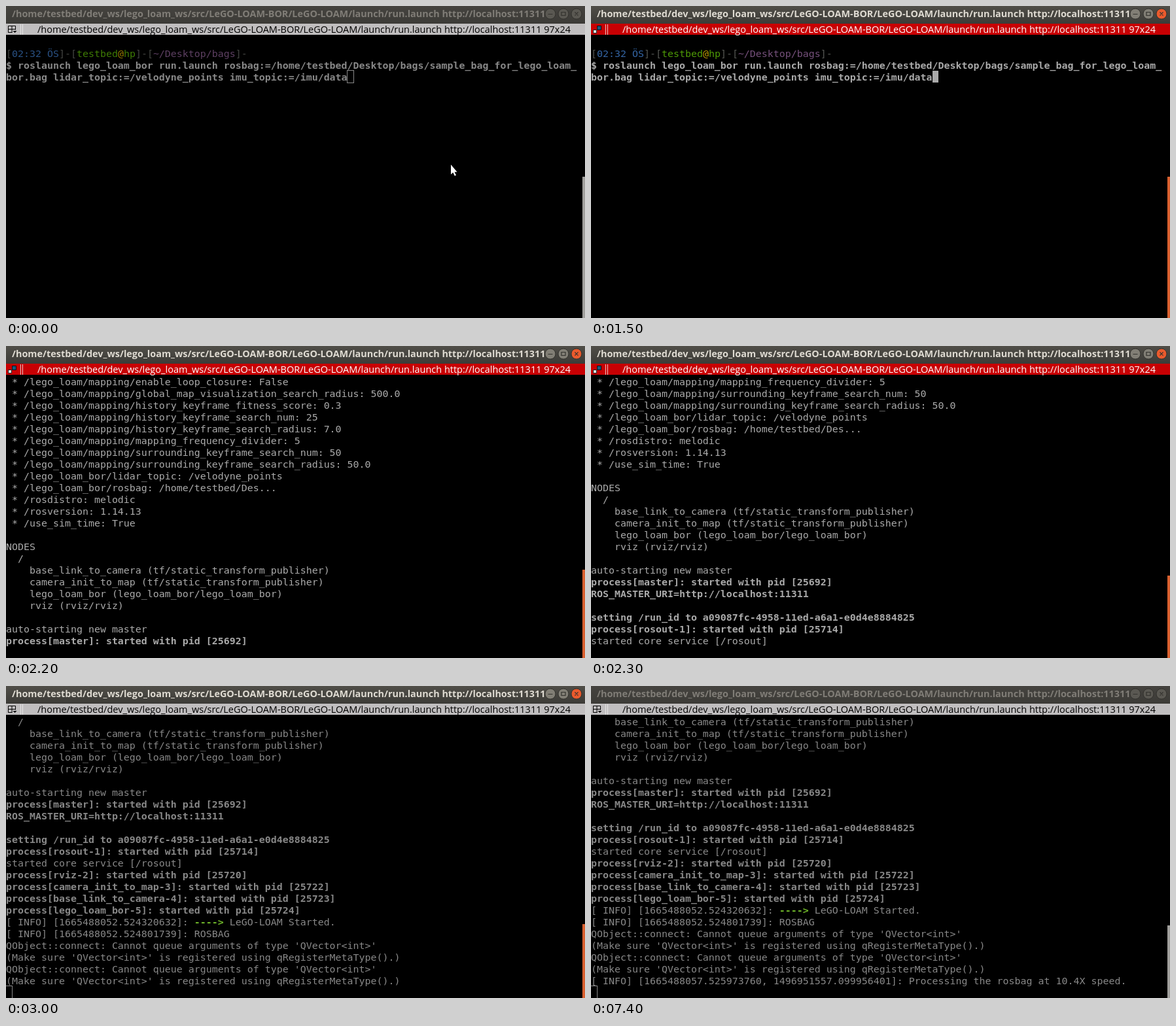
An HTML page that plays this animation: 885x477 px, repeating every 8 s.

```html
<!DOCTYPE html>
<html lang="en">
<head>
<meta charset="utf-8">
<title>Terminal launch</title>
<style>
html, body { margin: 0; width: 100%; height: 100%; overflow: hidden; background: #000; }
#stage { position: relative; width: 885px; height: 477px; overflow: hidden; background: #000; }
#stage * { box-sizing: border-box; }
#title, #tab {
  position: absolute; left: 0; width: 885px; white-space: pre;
  font: 14.43px/18px "Open Sans", "Noto Sans", sans-serif;
}
#title { top: 0; height: 27px; line-height: 24px; font-weight: 700; color: #807d77; background: linear-gradient(#45433f, #3c3b37); }
#tab { top: 27px; height: 17px; font-size: 14.5px; color: #000; background: #c0bebf; }
#title span, #tab span { position: absolute; top: 0; }
.windowFocus #title { color: #dfdbd2; background: linear-gradient(#504e48, #3c3b37); }
.paneFocus #tab { color: #fff; background: #c80003; }
svg { position: absolute; left: 0; top: 0; }
.button { fill: #5a5852; stroke: #33322e; }
.glyph { fill: none; stroke: #33322e; stroke-width: 1.2; }
.windowFocus .button { fill: #817e75; }
.windowFocus .close { fill: #ea5a2d; }
.activeIcon, .paneFocus .idleIcon { display: none; }
.paneFocus .activeIcon { display: inline; }
#screen { position: absolute; left: 0; top: 45px; width: 885px; height: 432px; overflow: hidden; }
#log {
  position: absolute; left: 0; margin-top: 1px; color: #aaa; opacity: .8;
  font: 14.95px/18px "DejaVu Sans Mono", monospace; font-variant-ligatures: none;
}
.paneFocus #log { opacity: 1; }
#log div { height: 18px; white-space: pre; }
.k { color: #555753; } .b { color: #3465a4; } .g { color: #4e9a06; }
.y { color: #c4a000; } .m { color: #75507b; } b.l { color: #8ae234; }
#cursor { position: absolute; width: 11px; height: 20px; margin: -1px; border: 1px solid #888; }
.paneFocus #cursor { width: 9px; height: 18px; margin: 0; border: 0; background: #aaa; }
#thumb { position: absolute; left: 881px; width: 4px; bottom: 0; background: #a09f9c; }
.windowFocus #thumb { background: #d9602f; }
</style>
</head>
<body>
<div id="stage">
  <div id="title"><span></span></div>
  <div id="tab"><span></span></div>
  <div id="screen"><div id="log"></div><div id="cursor"></div></div>
  <div id="thumb"></div>
  <svg width="885" height="477">
    <circle class="button" cx="832" cy="12" r="8"/>
    <circle class="button" cx="852" cy="12" r="8"/>
    <circle class="button close" cx="872" cy="12" r="8"/>
    <path class="glyph" d="M828.5 12.5h7M849 9.500h6v5h-6zM869.500 9.500l5 5m0-5l-5 5"/>
    <g class="idleIcon">
      <path d="M3.5 30.5h11v6M3.5 30.5v10h6M9 30.5v10M3.5 35.5h11" fill="none" stroke="#000"/>
      <path d="M10.5 38h6l-3 3z"/>
      <path d="M22.5 28v16M25.5 28v16" stroke="#e6e5e5"/>
    </g>
    <g class="activeIcon">
      <path d="M9.5 30.5h6v6h-6z" fill="#155a80" stroke="#111"/>
      <path d="M3.5 36.5h5v5h-5z" fill="#ddd" stroke="#222"/>
      <path d="M22.5 28v16M25.5 28v16" stroke="#f2c5c5"/>
    </g>
    <path id="arrow" d="M680 242.5v15l3.3-3 2.5 5.2 2.2-1-2.5-5h4z" fill="#fff"/>
    <path id="beam" d="M-2.5-6.5h2l.5.5.5-.5h2M0-6V6M-2.5 6.5h2L0 6l.5.5h2" fill="none" stroke="#ddd"/>
  </svg>
</div>
<script>
const LOOP = 8000, ROW = 18, COL = 9, ROWS = 24, SCROLLBACK = 24;
const launchPath = '/home/testbed/dev_ws/lego_loam_ws/src/LeGO-LOAM-BOR/LeGO-LOAM/launch/run.launch';
const masterUri = 'http://localhost:11311';

const bold = text => text.split('\n').map(line => `<b>${line}</b>`).join('\n');
const params = (prefix, text) => text.split('|').map(p => ` * /${prefix}${p}`).join('\n');
const queueWarning = `QObject::connect: Cannot queue arguments of type 'QVector&lt;int>'
(Make sure 'QVector&lt;int>' is registered using qRegisterMetaType().)`;

const log = `
<span class="k">[</span><span class="b">02:32 ÖS</span><span class="k">]-[</span><span class="g">testbed</span><span class="y">@</span><span class="g">hp</span><span class="k">]-[</span><span class="m">~/Desktop/bags</span><span class="k">]-</span>
${bold(`$ roslaunch lego_loam_bor run.launch rosbag:=/home/testbed/Desktop/bags/sample_bag_for_lego_loam_
bor.bag lidar_topic:=/velodyne_points imu_topic:=/imu/data
... logging to /home/testbed/.ros/log/a09087fc-4958-11ed-a6a1-e0d4e8884825/roslaunch-hp-25671.log
Checking log directory for disk usage. This may take a while.
Press Ctrl-C to interrupt
Done checking log file disk usage. Usage is &lt;1GB.

started roslaunch server http://hp:44135/`)}

SUMMARY
========

PARAMETERS
${params('lego_loam/featureAssociation/', 'edge_threshold: 0.1|nearest_feature_search_distance: 5|surf_threshold: 0.1')}
${params('lego_loam/imageProjection/', 'segment_theta: 60.0|segment_valid_line_num: 3|segment_valid_point_num: 5')}
${params('lego_loam/', 'imu_topic: /imu/data')}
${params('lego_loam/laser/', 'ground_scan_index: 7|num_horizontal_scans: 1800|num_vertical_scans: 16|scan_period: 0.1|sensor_mount_angle: 0.0|vertical_angle_bottom: -15.0|vertical_angle_top: 15.0')}
${params('lego_loam/mapping/', 'enable_loop_closure: False|global_map_visualization_search_radius: 500.0|history_keyframe_fitness_score: 0.3|history_keyframe_search_num: 25|history_keyframe_search_radius: 7.0|mapping_frequency_divider: 5|surrounding_keyframe_search_num: 50|surrounding_keyframe_search_radius: 50.0')}
${params('', 'lego_loam_bor/lidar_topic: /velodyne_points|lego_loam_bor/rosbag: /home/testbed/Des...|rosdistro: melodic|rosversion: 1.14.13|use_sim_time: True')}

NODES
  /
    base_link_to_camera (tf/static_transform_publisher)
    camera_init_to_map (tf/static_transform_publisher)
    lego_loam_bor (lego_loam_bor/lego_loam_bor)
    rviz (rviz/rviz)

auto-starting new master
${bold(`process[master]: started with pid [25692]
ROS_MASTER_URI=${masterUri}

setting /run_id to a09087fc-4958-11ed-a6a1-e0d4e8884825
process[rosout-1]: started with pid [25714]`)}
started core service [/rosout]
${bold(`process[rviz-2]: started with pid [25720]
process[camera_init_to_map-3]: started with pid [25722]
process[base_link_to_camera-4]: started with pid [25723]
process[lego_loam_bor-5]: started with pid [25724]`)}
[ INFO] [1665488052.524320632]: <b class="l">----></b> LeGO-LOAM Started.
[ INFO] [1665488052.524801739]: ROSBAG
${queueWarning}
${queueWarning}
[ INFO] [1665488057.525973760, 1496951557.099956401]: Processing the rosbag at 10.4X speed.`;

// Each step changes only the listed properties; beam is the pointer's y, 0 when hidden.
const steps = [
  [0, { lines: 4, typing: true, longTitle: true, pane: false, win: false, caret: true, arrow: true, beam: 0 }],
  [100, { arrow: false, beam: 243.5 }],
  [200, { beam: 262.5 }],
  [300, { beam: 276.5 }],
  [600, { pane: true }],
  [700, { win: true }],
  [1200, { caret: false }],
  [1500, { caret: true, beam: 0 }],
  [1700, { typing: false, beam: 276.5 }],
  [1800, { lines: 9, longTitle: false }],
  [1900, { lines: 10, beam: 0 }],
  [2000, { lines: 50, longTitle: true }],
  [2100, { lines: 51, caret: false }],
  [2200, { lines: 52 }],
  [2300, { lines: 57 }],
  [2400, { lines: 63 }],
  [2700, { caret: true }],
  [3000, { lines: 67, pane: false }],
  [3100, { win: false }],
  [7400, { lines: 68 }]
];

const $ = selector => document.querySelector(selector);
const show = (node, on) => { node.style.visibility = on ? 'visible' : 'hidden'; };
const stage = $('#stage'), logBox = $('#log'), cursor = $('#cursor'), thumb = $('#thumb');
const title = $('#title span'), tab = $('#tab span'), arrow = $('#arrow'), beam = $('#beam');
logBox.innerHTML = log.split('\n').map(line => `<div>${line}</div>`).join('');
const rows = [...logBox.children];

function render(s) {
  stage.classList.toggle('paneFocus', s.pane);
  stage.classList.toggle('windowFocus', s.win);
  const name = launchPath + (s.longTitle ? ' ' + masterUri : '');
  title.textContent = name;
  title.style.left = (s.longTitle ? 9 : 115) + 'px';
  tab.textContent = name + ' 97x24';
  tab.style.left = (s.longTitle ? 48 : 125) + 'px';

  const offset = Math.max(0, s.lines + 1 - ROWS);
  rows.forEach((row, i) => show(row, i >= offset && i < s.lines));
  logBox.style.top = -offset * ROW + 'px';
  cursor.style.left = (s.typing ? 58 * COL : 0) + 'px';
  cursor.style.top = (s.lines - offset - (s.typing ? 1 : 0)) * ROW + 'px';
  show(cursor, s.caret);

  const hidden = SCROLLBACK + offset;
  thumb.style.top = Math.round(45 + ROWS * ROW * hidden / (hidden + ROWS)) + 'px';
  show(arrow, s.arrow);
  show(beam, s.beam > 0);
  beam.setAttribute('transform', `translate(683.5 ${s.beam})`);
}

let shown = -1;
function tick() {
  const t = performance.now() % LOOP;
  const count = steps.filter(([at]) => at <= t).length;
  if (count !== shown) {
    shown = count;
    render(Object.assign({}, ...steps.slice(0, count).map(([, change]) => change)));
  }
  requestAnimationFrame(tick);
}
tick();
</script>
</body>
</html>
```
